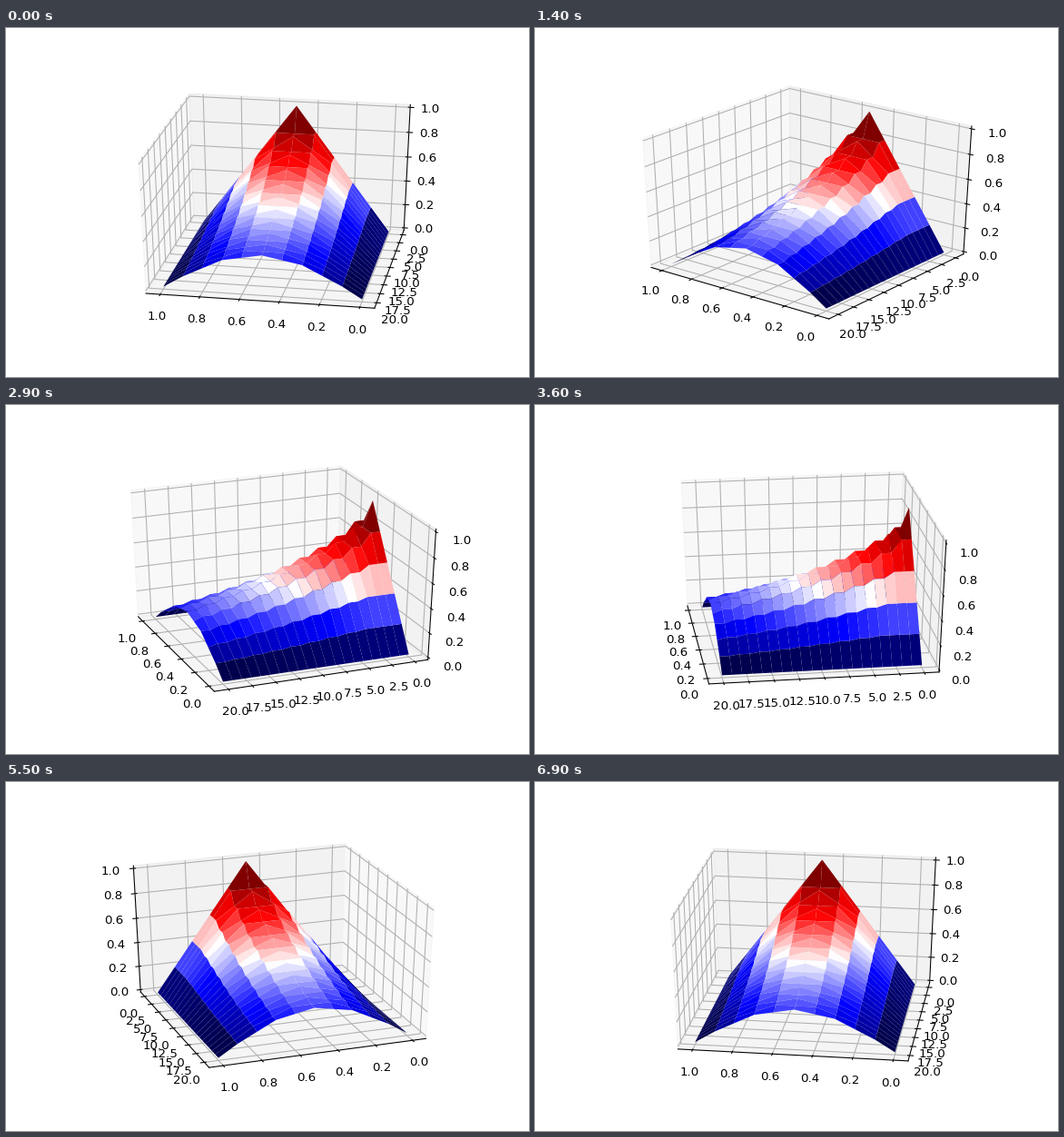
A matplotlib script for the animation above (7000 ms loop, 576 by 384 pixels).

```python
import numpy as np
import matplotlib.pyplot as plt
from matplotlib.animation import FuncAnimation
from matplotlib.collections import LineCollection, PolyCollection
from matplotlib.patches import Polygon

plt.rcParams["font.family"] = "DejaVu Sans"
plt.rcParams["font.size"] = 10

W, H, DPI = 576, 384, 96
FRAMES = 70
DIST, ELEV = 10, np.radians(30)

# Drawing area inside the figure and its view window
LEFT, BOTTOM = 0.125 * W, 0.125 * H
SX, SY = 0.775 * W / 0.185, 0.755 * H / 0.185
CX, CY = LEFT + 0.095 * SX, BOTTOM + 0.095 * SY

# The plot box is a unit cube around zero; the panes lie a little outside
EDGE = 0.5 + 1 / 48
DELTA = 1 / 12
LABEL_GAP = 11.5 * 48 / (0.75 * (0.775 * W + 0.755 * H)) * DELTA

TICKS = [np.linspace(0, 1, 6), np.linspace(0, 20, 9), np.linspace(0, 1, 6)]
LIMITS = [(-0.05, 1.05), (-1, 21), (0, 1)]
PANE_GREY = [0.95, 0.90, 0.925]
TICK_DIR = [1, 0, 0]
FLIP = [1, 0, 0]


def scale(values, axis):
    low, high = LIMITS[axis]
    return (np.asarray(values) - low) / (high - low) - 0.5


def heat_surface(cells=10, steps=20):
    """Explicit heat equation, starting from a triangle."""
    x = np.linspace(0, 1, cells + 1)
    rows = [1 - np.abs(2 * x - 1)]
    for _ in range(steps):
        u = rows[-1].copy()
        u[1:-1] = (rows[-1][:-2] + rows[-1][2:]) / 2
        rows.append(u)
    xs, ts = np.meshgrid(x, np.arange(steps + 1))
    return np.stack([scale(xs, 0), scale(ts, 1), scale(rows, 2)], axis=-1)


grid = heat_surface()
quads = np.stack([grid[:-1, :-1], grid[:-1, 1:], grid[1:, 1:], grid[1:, :-1]],
                 axis=2).reshape(-1, 4, 3)
level = quads[:, :, 2].mean(axis=1)
level = (level - level.min()) / (level.max() - level.min())
colors = plt.get_cmap("seismic")(level)

fig = plt.figure(figsize=(W / DPI, H / DPI), dpi=DPI, facecolor="white")
ax = fig.add_axes([0, 0, 1, 1])


def project(points, azim):
    """Return pixel positions and distances from the eye."""
    p = np.asarray(points, dtype=float)
    side = -p[..., 0] * np.sin(azim) + p[..., 1] * np.cos(azim)
    near = p[..., 0] * np.cos(azim) + p[..., 1] * np.sin(azim)
    rise = p[..., 2] * np.cos(ELEV) - near * np.sin(ELEV)
    depth = DIST - near * np.cos(ELEV) - p[..., 2] * np.sin(ELEV)
    xy = np.stack([CX + SX * side / depth, CY + SY * rise / depth], axis=-1)
    return xy, depth


def moved(point, axis, value):
    q = np.array(point, dtype=float)
    q[axis] = value
    return q


def draw_pane(axis, far, azim):
    a, b = [(1, 2), (0, 2), (0, 1)][axis]
    corners = []
    for s, t in [(-1, -1), (1, -1), (1, 1), (-1, 1)]:
        c = moved(far, a, s * EDGE)
        corners.append(moved(c, b, t * EDGE))
    grey = (PANE_GREY[axis],) * 3
    ax.add_patch(Polygon(project(corners, azim)[0], closed=False,
                         facecolor=grey, edgecolor=grey, alpha=0.5,
                         linewidth=1, zorder=1))


def draw_axis(axis, far, azim):
    z = 2 + axis * 0.1
    edge = moved(far, FLIP[axis], -far[FLIP[axis]])
    ends = [moved(edge, axis, -EDGE), moved(edge, axis, EDGE)]
    ax.add_collection(LineCollection(
        [project(ends, azim)[0]], colors="black", linewidths=0.8,
        capstyle="projecting", zorder=z))

    n1, n2 = (axis + 1) % 3, (axis + 2) % 3
    out = TICK_DIR[axis]
    sign = np.sign(edge[out])
    grid_lines, marks = [], []
    for value, pos in zip(TICKS[axis], scale(TICKS[axis], axis)):
        back = moved(far, axis, pos)
        path = [moved(back, n1, -far[n1]), back, moved(back, n2, -far[n2])]
        grid_lines.append(project(path, azim)[0])

        base = moved(edge, axis, pos)
        mark = [moved(base, out, edge[out] - 0.1 * sign * DELTA),
                moved(base, out, edge[out] + 0.2 * sign * DELTA)]
        marks.append(project(mark, azim)[0])

        spot = moved(edge + np.sign(edge) * LABEL_GAP, axis, pos)
        x, y = project(spot, azim)[0]
        ax.text(x, y, f"{value:.1f}", ha="center", va="top",
                color="black", zorder=z + 0.05)
    ax.add_collection(LineCollection(grid_lines, colors="#b0b0b0",
                                     linewidths=0.8, zorder=z + 0.02))
    ax.add_collection(LineCollection(marks, colors="black", linewidths=0.8,
                                     capstyle="projecting", zorder=z + 0.04))


def draw_surface(azim):
    xy, depth = project(quads, azim)
    order = np.argsort((1 / depth).mean(axis=1), kind="stable")
    ax.add_collection(PolyCollection(
        xy[order], facecolors=colors[order], edgecolors="none",
        linewidths=0, antialiaseds=True, zorder=3))


def draw(frame):
    ax.clear()
    ax.set_xlim(0, W)
    ax.set_ylim(0, H)
    ax.axis("off")
    # The view sweeps from 58 to 196 degrees, then jumps back
    azim = np.radians(58 + 2 * ((frame + 21) % FRAMES))
    far = np.array([-EDGE if np.cos(azim) > 0 else EDGE,
                    -EDGE if np.sin(azim) > 1e-9 else EDGE,
                    -EDGE])
    for axis in range(3):
        draw_pane(axis, far, azim)
    for axis in range(3):
        draw_axis(axis, far, azim)
    draw_surface(azim)
    return []


anim = FuncAnimation(fig, draw, frames=FRAMES, interval=100,
                     init_func=lambda: [], repeat=True, repeat_delay=0)
plt.show()
```
